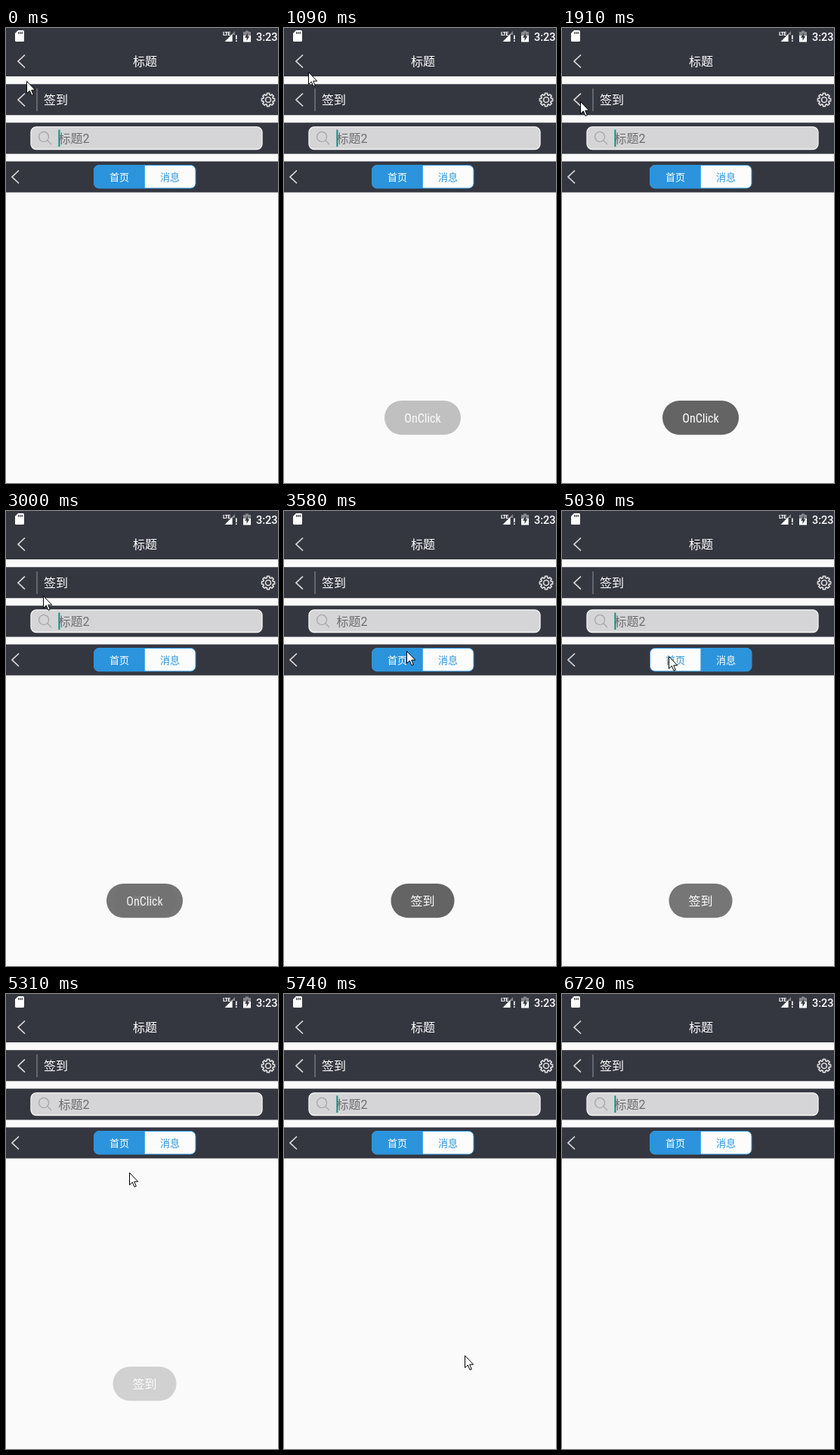
An HTML page that plays this animation: 360 px wide and 602 px high, repeating every 6.82 s.

```html
<!DOCTYPE html>
<html lang="zh-CN">
<meta charset="utf-8">
<title>Title bars</title>
<style>
html, body { margin: 0; width: 100%; height: 100%; overflow: hidden; background: #fafafa; }
svg { display: block; }
text { font: 16px Roboto, "Noto Sans CJK SC", "Noto Sans CJK", sans-serif; fill: #fff; }
.mid { text-anchor: middle; }
.narrow { font-family: "Roboto Condensed", Roboto, sans-serif; font-stretch: condensed; }
.bar { fill: #353740; }
.dim { fill: #85868b; }
.white { fill: #fff; }
.line { fill: none; stroke: #dcdcde; stroke-width: 1.7; }
.seg text { font-size: 13px; }
.toast rect { fill: #646464; }
</style>
<svg width="360" height="602" viewBox="0 0 360 602">
  <clipPath id="pill"><rect x="116.500" y="181.500" width="134.500" height="30.500" rx="6.500"/></clipPath>
  <rect width="360" height="602" fill="#fafafa"/>
  <path class="bar" d="M0 0H360V64H0zM0 74.300H360V115.200H0zM0 125.300H360V166.500H0zM0 176.500H360V217.400H0z"/>

  <!-- status bar -->
  <path class="white" d="M16 3H22.500Q24 3 24 4.500V16.500Q24 18 22.500 18H13.500Q12 18 12 16.500V7z"/>
  <path stroke="#353740" stroke-width="1.200" d="M16.700 5V8M19 5V8M21.300 5V8"/>
  <text class="narrow" x="287" y="10" style="font-size:8px;font-weight:700;letter-spacing:-.6px">LTE</text>
  <path class="dim" d="M303 4V9H299.500V18H289z"/>
  <path class="white" d="M299.500 8V18H290zM304 9.500H305.600V15H304zM304 16.300H305.600V18H304z"/>
  <path class="dim" d="M317 3.500H321V5H324V11H314V5H317z"/>
  <path class="white" d="M314 10H324V18.500H314z"/>
  <path class="bar" d="M320 6.500L316 12.800H318.500V17L322.300 10.800H320z"/>
  <text x="331" y="16.500" style="font-size:14.500px;font-weight:500">3:23</text>

  <!-- title rows -->
  <path class="line" d="M25 35.500L16 44L25 52.500M25 86.500L16 95L25 103.500M17 188.500L8 197L17 205.500"/>
  <text class="mid" x="184" y="50" style="font-weight:500">标题</text>
  <path stroke="#76777d" stroke-width="1.500" d="M41 80V110"/>
  <text x="50" y="101">签到</text>
  <path id="gear" class="line" stroke-linejoin="round"/>
  <circle class="line" cx="347" cy="95" r="3.500"/>

  <!-- search field -->
  <rect x="33" y="130.800" width="306" height="29.700" rx="7" fill="#d5d5d7" stroke="#f6f6f7" stroke-width="1.300"/>
  <path fill="none" stroke="#a6a6a9" stroke-width="1.200" d="M54.600 148.600A6.500 6.500 0 1 1 54.700 148.500L60 154"/>
  <text x="69.500" y="152" style="fill:#6e6e71">标题2</text>
  <rect id="caret" x="69.400" y="134.500" width="2" height="22.500" fill="#0f9080"/>

  <!-- segmented switch -->
  <g class="seg">
    <g clip-path="url(#pill)">
      <rect x="116" y="181" width="136" height="32" fill="#fcfcfc"/>
      <rect id="pick" y="181" width="67.800" height="32" fill="#2b94dc"/>
    </g>
    <rect x="116.500" y="181.500" width="134.500" height="30.500" rx="6.500" fill="none" stroke="#2b94dc"/>
    <text id="home" class="mid" x="150" y="202">首页</text>
    <text id="news" class="mid" x="217" y="202">消息</text>
  </g>

  <g id="clicked" class="toast">
    <rect x="133" y="493" width="101" height="45.300" rx="22.600"/>
    <text class="mid narrow" x="183.500" y="522">OnClick</text>
  </g>
  <g id="signed" class="toast">
    <rect x="141.500" y="493" width="84" height="45.300" rx="22.600"/>
    <text class="mid" x="183.500" y="522">签到</text>
  </g>
  <path id="cursor" fill="#fff" stroke="#000" d="M.5 .5V16.500L4.300 13L7 19.300L9.300 18.300L6.700 12.200H11.700z"/>
</svg>
<script>
const LOOP = 6820, STEPS = 50, STEP = LOOP / STEPS;
const FADE = 450, TOAST = 2030, BLUE = '#2b94dc';
const el = id => document.getElementById(id);
const clamp = v => Math.max(0, Math.min(1, v));

// Pointer stops: step, x, y
const stops = [[0, 27, 70], [4, 22, 43], [7, 22, 43], [8, 32, 58], [14, 24, 97], [21, 21, 94],
  [26, 162, 185], [31, 214, 201], [34, 214, 201], [37, 141, 192], [38, 141, 192],
  [39, 163, 236], [44, 290, 640], [STEPS, 290, 640]];

function pointer(step) {
  const i = stops.findIndex(s => s[0] > step);
  const [a, ...from] = stops[i - 1], [b, ...to] = stops[i];
  return from.map((v, n) => Math.round(v + (to[n] - v) * (step - a) / (b - a)));
}

const toast = age => clamp(age / FADE) * clamp(1 - (age - TOAST) / FADE);

function gear(cx, cy, teeth) {
  const points = Array.from({ length: teeth * 4 }, (_, i) => {
    const corner = i % 4, side = corner < 2 ? -1 : 1;
    const tip = corner === 1 || corner === 2;
    const a = Math.floor(i / 4) * 2 * Math.PI / teeth + side * (tip ? .19 : .27);
    const r = tip ? 8.7 : 6.7;
    return `${cx + r * Math.cos(a)} ${cy + r * Math.sin(a)}`;
  });
  return `M${points.join('L')}z`;
}

// The screen refreshes in even steps, slightly ahead of the clock
function draw(now) {
  const step = Math.floor((now % LOOP + 40) / STEP) % STEPS, t = step * STEP;
  const news = step >= 34 && step < 38;
  el('cursor').setAttribute('transform', `translate(${pointer(step)})`);
  el('caret').style.opacity = (t + 330) % 1000 < 500 ? 1 : 0;
  el('clicked').style.opacity = toast(t - 920);
  el('signed').style.opacity = toast(t - 2960);
  el('pick').setAttribute('x', news ? 183.4 : 116);
  el('home').style.fill = news ? BLUE : '#fff';
  el('news').style.fill = news ? '#fff' : BLUE;
}

el('gear').setAttribute('d', gear(347, 95, 8));
const start = performance.now();
function loop() {
  draw(performance.now() - start);
  requestAnimationFrame(loop);
}
loop();
</script>
</html>
```
